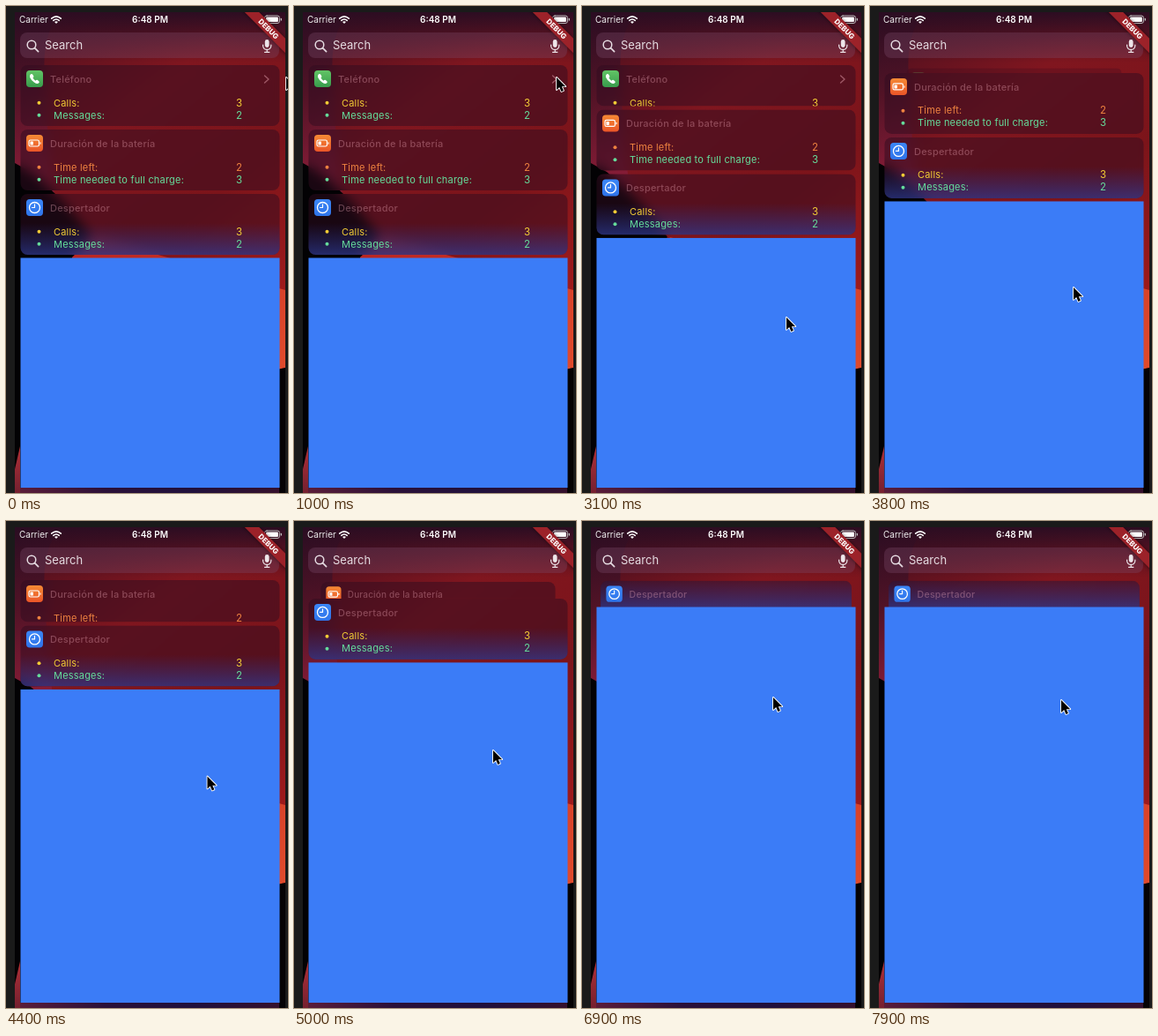
These frames come from a looping animation (320x552 px, 8 s). An HTML page with a canvas:

```html
<!DOCTYPE html>
<html lang="es">
<head>
<meta charset="utf-8">
<style>
html, body { margin: 0; width: 100%; height: 100%; overflow: hidden; background: #1a1a1a; }
canvas { display: block; }
</style>
</head>
<body>
<canvas id="stage" width="320" height="552"></canvas>
<script>
const W = 320, H = 552, LOOP = 8000;
const TOP = 67, CARD_H = 69, PITCH = 73;
const FONT = 'Inter, Roboto, sans-serif';
const YELLOW = '#f2cc35', GREEN = '#65dc9b', ORANGE = '#ee8240';
const ctx = document.getElementById('stage').getContext('2d');

// [ms, x, y] of the pointer tip and [ms, offset] of the list
const POINTER = [[0, 318, 81], [200, 318, 81], [900, 298, 81], [2050, 298, 81],
  [2600, 234, 374], [2750, 234, 374], [3100, 232, 353], [3800, 231, 319],
  [5000, 226, 260], [5900, 217, 195], [6400, 217, 195], [7200, 217, 203]];
const SCROLL = [[0, 0], [2750, 0], [3100, 22.5], [3800, 64], [5000, 125], [5900, 188]];

const CARDS = [
  { title: 'Teléfono', icon: phone, tint: ['#62c466', '#389c4c'], chevron: true,
    rows: [['Calls:', 3, YELLOW], ['Messages:', 2, GREEN]] },
  { title: 'Duración de la batería', icon: battery, tint: ['#f58a35', '#ea5528'],
    rows: [['Time left:', 2, ORANGE], ['Time needed to full charge:', 3, GREEN]] },
  { title: 'Despertador', icon: clock, tint: ['#3b86f6', '#2f74ea'], glow: true,
    rows: [['Calls:', 3, YELLOW], ['Messages:', 2, GREEN]] }
];

const clamp = v => Math.max(0, Math.min(1, v));

function sample(keys, t) {
  const i = keys.findIndex(k => k[0] > t);
  if (i < 0) return keys[keys.length - 1].slice(1);
  const a = keys[i - 1], b = keys[i], u = (t - a[0]) / (b[0] - a[0]);
  return a.slice(1).map((v, j) => v + (b[j + 1] - v) * u);
}

function ramp(c, x0, y0, x1, y1, ...colors) {
  const g = c.createLinearGradient(x0, y0, x1, y1);
  colors.forEach((col, i) => g.addColorStop(i / (colors.length - 1), col));
  return g;
}

function box(x, y, w, h, r, fill) {
  ctx.beginPath();
  ctx.roundRect(x, y, w, h, r);
  if (fill) { ctx.fillStyle = fill; ctx.fill(); }
}

function text(str, x, y, size, color, weight = 400, align = 'left') {
  ctx.font = `${weight} ${size}px ${FONT}`;
  ctx.textAlign = align;
  ctx.fillStyle = color;
  ctx.fillText(str, x, y);
}

function stroke(path, color, width) {
  ctx.strokeStyle = color;
  ctx.lineWidth = width;
  ctx.lineCap = ctx.lineJoin = 'round';
  ctx.stroke(new Path2D(path));
}

function layer(paint) {
  const c = document.createElement('canvas');
  c.width = W; c.height = H;
  paint(c.getContext('2d'));
  return c;
}

const wallpaper = layer(c => {
  const shape = (d, fill) => { c.fillStyle = fill; c.fill(new Path2D(d)); };
  shape('M10 7H317V552H10Z', ramp(c, 60, 0, 317, 330, '#50101f', '#80161f', '#7c141a', '#a01b1c'));
  shape('M10 7H317V64H10Z', ramp(c, 0, 7, 0, 64, '#2c0d22', '#2c0d2200'));
  shape('M10 7H62Q40 32 44 80Q46 150 56 222L10 180Z', ramp(c, 10, 7, 40, 190, '#2a0d22', '#521326', '#841c36'));
  shape('M10 178L28 188Q70 222 97 262L75 285V552H10Z', '#030204');
  shape('M75 285L100 262L317 322V410L230 430L75 310Z', ramp(c, 75, 280, 317, 400, '#b92622', '#c62f24', '#df4a2c'));
  shape('M230 428L317 410V552H75V500Z', '#050204');
  shape('M10 525L16 499V552H10Z', ramp(c, 0, 499, 0, 552, '#b03038', '#75202f'));
});
const frosted = layer(c => { c.filter = 'blur(7px)'; c.drawImage(wallpaper, 0, 0); });

function phone() {
  ctx.fillStyle = '#fff';
  ctx.fill(new Path2D('M-4.5 -5.2Q-3 -6.3 -2 -4.4L-1.2 -2.9Q-.8 -2.1 -2 -1Q-1 1.1 1 2.2Q2 .9 2.9 1.3L4.6 2.4Q6.1 3.5 4.7 4.8Q3 6.4 -.6 3.9Q-4 1.5 -5.3 -1.6Q-6 -3.9 -4.5 -5.2Z'));
}

function battery() {
  box(-6.5, -3.5, 11.5, 7, 1.8);
  ctx.strokeStyle = '#fff'; ctx.lineWidth = 1.2; ctx.stroke();
  box(-5, -2, 3.4, 4, .6, '#fff');
  box(6.1, -1.3, 1, 2.6, .5, '#fff');
}

function clock() {
  ctx.beginPath(); ctx.arc(0, 0, 6, 0, 7);
  ctx.strokeStyle = '#fff'; ctx.lineWidth = 1.3; ctx.stroke();
  stroke('M0 -3.7V0H-3', '#fff', 1.2);
}

function drawCard(card, index, scroll) {
  const natural = TOP + index * PITCH - scroll, next = natural + PITCH;
  const room = next - TOP;
  if (room <= 1) return;
  const scale = Math.min(1, 1 - (36 - room) * .0063);
  const top = Math.max(TOP + (1 - scale) * 20, natural);
  const bottom = next - 4 * clamp((room - 32) / 10);
  const height = bottom - top;
  if (height <= 0) return;
  const half = 147 * scale, left = 163.5 - half;

  ctx.save();
  ctx.globalAlpha = clamp(room / 20);
  box(left, top, half * 2, height, [8, 8, room > 36 ? 8 : 0, room > 36 ? 8 : 0]);
  ctx.clip();
  ctx.drawImage(frosted, 0, 0);
  ctx.fillStyle = 'rgba(48,12,32,.5)';
  ctx.fillRect(0, top, W, height);
  if (card.glow) {
    ctx.fillStyle = ramp(ctx, 0, bottom - 36, 0, bottom, 'rgba(40,55,150,0)', 'rgba(44,64,160,.62)');
    ctx.fillRect(0, top, W, height);
  }

  ctx.translate(163.5, top);
  ctx.scale(scale, scale);
  ctx.translate(-163.5, 0);
  box(23, 6, 19, 19, 4, ramp(ctx, 0, 6, 0, 25, ...card.tint));
  ctx.save();
  ctx.translate(32.5, 15.5);
  card.icon();
  ctx.restore();
  ctx.letterSpacing = '.2px';
  text(card.title, 50, 20, 11, 'rgba(255,185,200,.33)', 500);
  if (card.chevron) stroke('M293.5 12L298 16L293.5 20', 'rgba(255,185,200,.42)', 1.4);
  card.rows.forEach(([label, value, color], i) => {
    const y = 46.5 + i * 14;
    text(label, 54, y, 11, color);
    text(value, 261, y, 11.5, color);
    ctx.beginPath(); ctx.arc(37.5, y - 3.8, 2, 0, 7); ctx.fill();
  });
  ctx.letterSpacing = '0px';
  ctx.restore();
}

function drawStatus() {
  text('Carrier', 15, 19, 10, '#eee');
  text('6:48 PM', 163.5, 19, 10, '#fff', 600, 'center');
  stroke('M51.7 14.2Q57 9.6 62.3 14.2M53.8 16.4Q57 13.6 60.2 16.4', '#fff', 1.6);
  ctx.fillStyle = '#fff';
  ctx.fill(new Path2D('M55 18Q57 16.4 59 18L57 20Z'));
  box(293.5, 11, 17, 8.5, 2.5);
  ctx.strokeStyle = '#bbb'; ctx.lineWidth = 1; ctx.stroke();
  box(295, 12.5, 14, 5.5, 1.3, '#fff');
  box(311.7, 13.7, 1.3, 3, .6, '#bbb');
}

function drawSearch() {
  box(16, 30, 294, 29, 8, 'rgba(125,75,105,.34)');
  ctx.beginPath(); ctx.arc(29, 44, 4.8, 0, 7);
  ctx.strokeStyle = '#e6dce2'; ctx.lineWidth = 1.5; ctx.stroke();
  stroke('M32.6 47.6L36.6 51.6', '#e6dce2', 1.7);
  text('Search', 44, 49, 13, '#e6dce2');
  box(293.8, 38, 4.8, 9, 2.4, '#eee6ea');
  stroke('M291.6 44V45.2Q292 49.4 296.2 49.4Q300.4 49.4 300.8 45.2V44M296.2 49.5V52.2M293.6 52.4H298.8', '#eee6ea', 1.2);
}

function drawBanner() {
  ctx.save();
  ctx.beginPath(); ctx.rect(10, 7, 307, 60); ctx.clip();
  ctx.translate(298, 26);
  ctx.rotate(Math.PI / 4);
  ctx.shadowColor = 'rgba(0,0,0,.5)';
  ctx.shadowBlur = 4;
  ctx.fillStyle = '#9c2229';
  ctx.fillRect(-45, -5.8, 90, 11.6);
  ctx.shadowBlur = 0;
  text('DEBUG', 0, 3, 8.2, '#fff', 800, 'center');
  ctx.restore();
}

function drawPointer(x, y) {
  ctx.save();
  ctx.translate(x, y);
  const arrow = 'M0 0V14L3.2 11.1L5.4 16L7.9 14.9L5.8 10.2H10.2Z';
  stroke(arrow, '#fff', 1.8);
  ctx.fillStyle = '#000';
  ctx.fill(new Path2D(arrow));
  ctx.restore();
}

function draw(now) {
  const t = now % LOOP;
  const [scroll] = sample(SCROLL, t);
  ctx.fillStyle = '#1a1a1a';
  ctx.fillRect(0, 0, W, H);
  ctx.drawImage(wallpaper, 0, 0);
  drawStatus();
  drawSearch();
  CARDS.forEach((card, i) => drawCard(card, i, scroll));
  const top = 285.5 - scroll;
  ctx.fillStyle = '#3b7cf7';
  ctx.fillRect(16.5, top, 294, 546 - top);
  ctx.fillStyle = ramp(ctx, 16, 0, 310, 0, '#5a1c38', '#2a1038', '#20103c', '#35102c');
  ctx.fillRect(16, 546, 294, 6);
  drawBanner();
  drawPointer(...sample(POINTER, t));
}

const start = performance.now();
function tick() {
  draw(performance.now() - start);
  requestAnimationFrame(tick);
}
tick();
</script>
</body>
</html>
```
